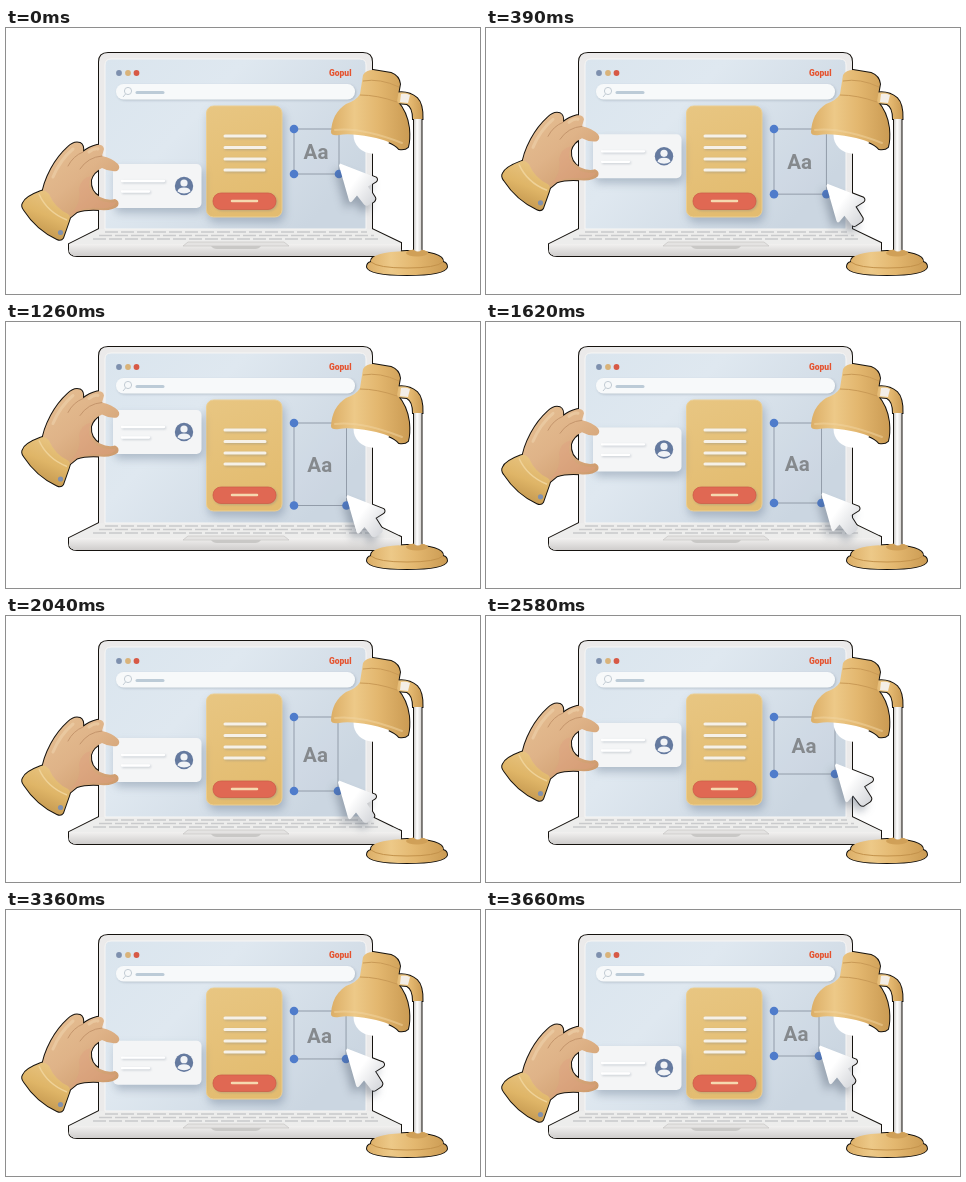
These frames come from a looping animation (474 by 266 pixels, 3720 ms). An HTML page:

```html
<!DOCTYPE html>
<html lang="en">
<head>
<meta charset="utf-8">
<title>Design desk</title>
<style>
html, body { margin: 0; height: 100%; overflow: hidden; background: #fff; }
svg { display: block; width: 474px; height: 266px; }
.rim { stroke: #16130f; stroke-width: 2; }
.line { fill: none; stroke: #f6f1e8; stroke-width: 3; stroke-linecap: round; }
.soft { filter: drop-shadow(2px 5px 4px #52688059); }
.lift { filter: drop-shadow(1px 1.5px 1px #68788a55); }
.cast { filter: drop-shadow(-4px 6px 4px #4a586866); }
</style>
</head>
<body>
<svg viewBox="0 0 474 266">
  <defs>
    <linearGradient id="glass" x2="1" y2=".6"><stop stop-color="#dae5ee"/><stop offset=".4" stop-color="#dfe8f0"/><stop offset="1" stop-color="#cbd6e1"/></linearGradient>
    <linearGradient id="front" x2="0" y2="1"><stop stop-color="#f2f1f0"/><stop offset="1" stop-color="#cfcdcc"/></linearGradient>
    <linearGradient id="paper" x2=".3" y2="1"><stop stop-color="#e8c682"/><stop offset="1" stop-color="#e3bc70"/></linearGradient>
    <linearGradient id="skin" x2=".8" y2="1"><stop stop-color="#e6c093"/><stop offset=".5" stop-color="#dfb388"/><stop offset="1" stop-color="#cd9a6c"/></linearGradient>
    <linearGradient id="cloth" x1=".7" y1="0" x2=".3" y2="1"><stop stop-color="#e9c685"/><stop offset=".5" stop-color="#dfb567"/><stop offset="1" stop-color="#bd9049"/></linearGradient>
    <linearGradient id="brass"><stop stop-color="#dcae66"/><stop offset=".3" stop-color="#edc988"/><stop offset=".6" stop-color="#e3b76f"/><stop offset="1" stop-color="#cb9b53"/></linearGradient>
    <linearGradient id="tube"><stop stop-color="#c9c7c4"/><stop offset=".4" stop-color="#fff"/><stop offset="1" stop-color="#d5d3d0"/></linearGradient>
    <linearGradient id="arrow" x2="1" y2=".8"><stop offset=".45" stop-color="#fff"/><stop offset="1" stop-color="#d6d8dc"/></linearGradient>
  </defs>

  <!-- dark rims, visible only against the page -->
  <g class="rim">
    <use href="#laptop"/><use href="#lamp"/><use href="#hand"/><use href="#cursor"/>
  </g>

  <g id="laptop">
    <path fill="#ebeaea" d="M93 205V34Q93 25 102 25H357Q366 25 366 34V205Z"/>
    <path fill="#ededec" d="M93 201H366L395 215V221Q395 228 387 228H71Q63 228 63 221V216Z"/>
    <path fill="url(#front)" stroke="none" d="M63 216H395V221Q395 228 387 228H71Q63 228 63 221Z"/>
  </g>
  <path fill="url(#glass)" stroke="#f7f6f5" d="M99 201V37Q99 31 105 31H354Q360 31 360 37V201Z"/>
  <g fill="none" stroke="#c9cacc" stroke-dasharray="13 3" stroke-width="1.3">
    <path d="M99 204H361M93 207.5H368M87 211H375"/>
  </g>
  <path fill="#e4e3e2" stroke="#c6c5c3" stroke-width=".7" d="M182 214H278L283 218H177Z"/>
  <path fill="#c9c8c6" d="M205 218H255Q253 221 249 221H211Q207 221 205 218Z"/>

  <!-- browser -->
  <circle cx="113" cy="45" r="2.9" fill="#7e90ae"/>
  <circle cx="122" cy="45" r="2.9" fill="#d9b37a"/>
  <circle cx="130.5" cy="45" r="2.9" fill="#d75946"/>
  <text x="323" y="48" font-family="Roboto, sans-serif" font-weight="900" font-size="8.5" fill="#e5532f">Gopul</text>
  <rect class="lift" x="110" y="56" width="239" height="15.5" rx="7.5" fill="#f7f9fa"/>
  <g fill="none" stroke="#c3ccd4"><circle cx="122" cy="63" r="3.6"/><path d="M119.5 66L117 69"/></g>
  <path class="line" style="stroke:#bccbd7" d="M131 64.5H157"/>

  <!-- yellow card -->
  <rect class="soft" x="200.5" y="78" width="75.5" height="111" rx="7" fill="url(#paper)" stroke="#ebce93"/>
  <path class="line lift" d="M219 108H259M219 119.5H259M219 131H259M219 142H258"/>
  <rect class="lift" x="207" y="165" width="63" height="16.5" rx="8" fill="#e06853" stroke="#cf5a45" stroke-width=".7"/>
  <path class="line" style="stroke:#f5d9b0;stroke-width:2.5" d="M226 173H251"/>

  <!-- text frame -->
  <rect id="frame" x="288" y="101" fill="#c6d2de22" stroke="#929ca9"/>
  <g id="dots" fill="#4f7ccb"></g>
  <text id="label" font-family="Roboto, sans-serif" font-weight="700" font-size="20.5" fill="#85898d" text-anchor="middle">Aa</text>
  <g class="cast">
    <path id="cursor" fill="url(#arrow)" d="M1 0L37 14Q39 16 37 18L29 23L36 34Q37 36 35 38L29 42Q27 43 25 41L18 32L13 38Q11 40 10 37L0 2Z"/>
  </g>

  <!-- contact card -->
  <g id="card">
    <rect class="soft" x="107" y="136" width="88.5" height="44" rx="5" fill="#f4f5f6"/>
    <path class="line lift" style="stroke:#fff;stroke-width:2.3" d="M116 153H158M116 163.5H143"/>
    <circle cx="178" cy="158" r="9.2" fill="#657a9f"/>
    <circle cx="178" cy="155" r="3.6" fill="#f1f3f6"/>
    <path fill="#f1f3f6" d="M171.5 163.5Q172 159.5 178 159.5T184.5 163.5Q178 167.5 171.5 163.5Z"/>
  </g>

  <g id="hand">
    <path fill="url(#skin)" d="M36 168Q37 156 45 141Q52 128 62 119Q68 113 74 115Q78 117 77 124Q83 119 91 117Q97 116 98 121L96 128Q106 130 112 136Q115 140 111 143Q103 144 96 140Q87 144 85 152Q84 164 94 169Q102 173 109 171Q114 173 112 178Q107 183 94 182Q80 181 71 184L60 193Z"/>
    <path fill="none" stroke="#c4956c" stroke-linecap="round" stroke-width="1" d="M77 124Q67 128 62 138M96 128Q82 129 74 141"/>
    <path fill="none" stroke="#efd2ac" stroke-width="3" stroke-linecap="round" opacity=".6" d="M47 149Q54 132 67 121M83 124Q88 120 92 121"/>
    <path fill="#df9f80" stroke="none" opacity=".4" d="M85 148Q79 161 91 171Q101 176 110 174Q108 181 94 180Q77 178 64 187Q76 175 73 161Q75 150 85 148Z"/>
    <path fill="url(#cloth)" d="M17 175Q19 169 35 163Q39 161 43 166Q49 180 62 186Q65 188 63 193L57 210Q55 213 51 211Q31 202 18 182Q15 178 17 175Z"/>
    <path fill="none" stroke="#efd298" stroke-width="1.5" d="M33 166Q41 184 61 192"/>
    <circle cx="54.5" cy="204.5" r="2.6" fill="#8391aa" stroke="none"/>
  </g>

  <g id="lamp">
    <path fill="url(#brass)" d="M361 239Q361 235 365 234Q364 224 401 223Q438 224 437 234Q441 235 441 239Q439 247 401 247Q363 247 361 239Z"/>
    <path fill="none" stroke="#c3924b" stroke-width="1" d="M365 234Q372 240 401 240T437 234"/>
    <ellipse cx="411" cy="225" rx="11" ry="3.5" fill="#d0a058" stroke="none"/>
    <path fill="url(#tube)" d="M408 82H415.5V222Q412 225 408 222Z"/>
    <path fill="url(#brass)" d="M388 65Q402 62 411 70Q417 76 416.5 91H407Q407 79 401 76L390 75Z"/>
    <path fill="#f3eee7" stroke="none" d="M395 66Q400 65 404 67L402 75L394 74Z"/>
    <circle cx="366" cy="107" r="18.5" fill="#fff" stroke="none"/>
    <path fill="url(#brass)" d="M325 104Q326 85 340 76Q351 72 354 66L357 47Q360 42 367 42L385 45Q393 48 394 56L391 73Q401 84 403 100Q404 112 402 119Q399 122 393 121Q386 113 365 109Q344 105 333 107Q325 108 325 104Z"/>
    <path fill="none" stroke="#c99a56" stroke-width="1" d="M354 67Q371 67 391 74M357 53Q374 50 393 59"/>
    <path fill="none" stroke="#f2d6a2" stroke-width="2" stroke-linecap="round" opacity=".5" d="M329 102Q355 99 396 115"/>
  </g>
</svg>
<script>
const LOOP = 3720, STEP = 30;
const times = [0, 750, 1260, 2040, 2580, 3090, 3660];
const tracks = {
  hand: [0, -56, -47.5, -13, -27, -21, 0],
  card: [0, -56, -48, -14, -29, -13.5, 0],
  right: [333, 347, 340.5, 332, 349, 347, 333],
  bottom: [146, 184, 183.5, 175, 158, 153, 146]
};
const $ = id => document.getElementById(id);
const set = (node, attrs) => {
  for (const name in attrs) node.setAttribute(name, attrs[name]);
};
const dots = Array.from({ length: 4 }, () => {
  const dot = document.createElementNS("http://www.w3.org/2000/svg", "circle");
  set(dot, { r: 4.3 });
  return $("dots").appendChild(dot);
});

// Monotone cubic: turning points get zero slope.
function slope(v, i) {
  if (i === 0 || i === v.length - 1) return 0;
  const a = (v[i] - v[i - 1]) / (times[i] - times[i - 1]);
  const b = (v[i + 1] - v[i]) / (times[i + 1] - times[i]);
  return a * b > 0 ? 2 * a * b / (a + b) : 0;
}
function sample(v, t) {
  let i = 0;
  while (i < times.length - 2 && t >= times[i + 1]) i++;
  const span = times[i + 1] - times[i], u = (t - times[i]) / span;
  const s = u * u * (3 - 2 * u);
  return v[i] + (v[i + 1] - v[i]) * s
    + span * u * (1 - u) * ((1 - u) * slope(v, i) - u * slope(v, i + 1));
}

function draw(now) {
  const t = Math.min(Math.floor(now % LOOP / STEP) * STEP, 3660);
  const right = sample(tracks.right, t), bottom = sample(tracks.bottom, t);
  for (const id of ["hand", "card"])
    set($(id), { transform: `translate(0 ${sample(tracks[id], t)})` });
  set($("frame"), { width: right - 288, height: bottom - 101 });
  dots.forEach((dot, i) => set(dot, { cx: i % 2 ? right : 288, cy: i < 2 ? 101 : bottom }));
  set($("label"), { x: (288 + right) / 2 - .5, y: (101 + bottom) / 2 + 7.8 });
  set($("cursor"), { transform: `translate(${right} ${bottom - 10.5})` });
  requestAnimationFrame(draw);
}
draw(0);
</script>
</body>
</html>
```
